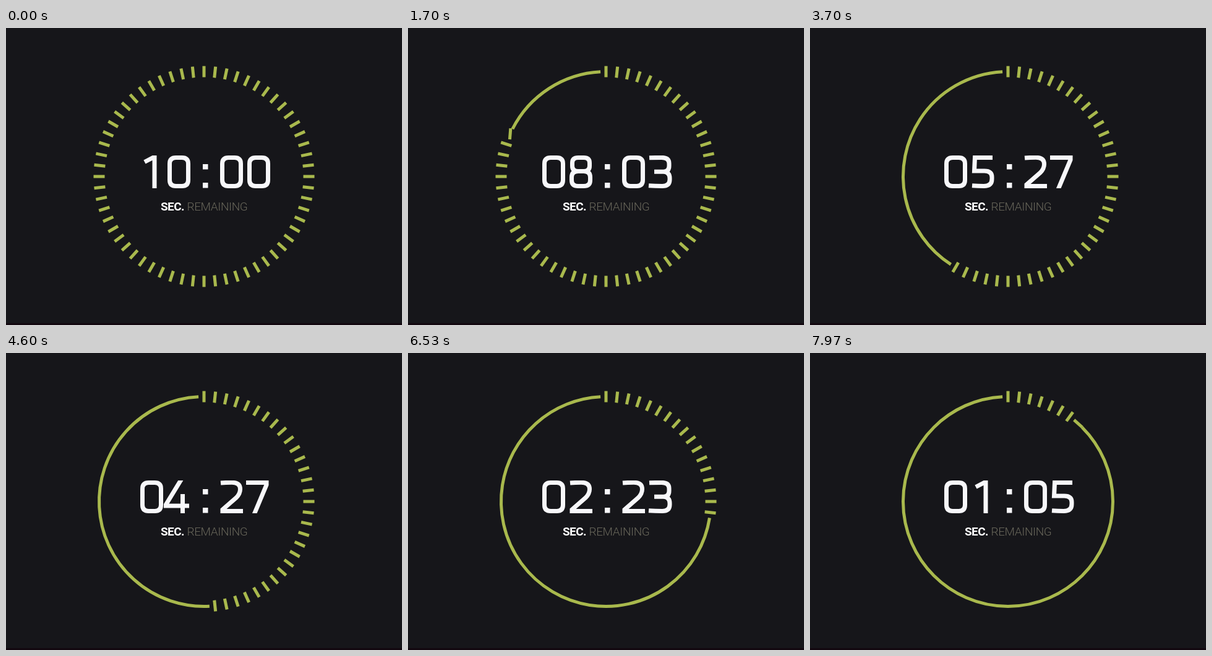
These frames come from a looping animation (640x480 px, 8 s). An HTML page with a canvas:

```html
<!DOCTYPE html>
<html lang="en">
<head>
<meta charset="utf-8">
<title>Countdown</title>
<style>
  html, body { margin: 0; width: 100%; height: 100%; overflow: hidden; background: #16161a; }
  canvas { display: block; }
</style>
</head>
<body>
<canvas id="stage" width="640" height="480"></canvas>
<script>
const ctx = document.getElementById('stage').getContext('2d');
const LOOP = 8000, FPS = 30, TOTAL = 300;
const BG = '#16161a', GREEN = '#a9b94d', WHITE = '#f7f7fa', GREY = '#69675b';
const CX = 320, CY = 240, RADIUS = 169.5, TICK = 18, WIDTH = 5;
const STEP = Math.PI / 30;
const DIGIT_X = [217, 261, 346, 390], DIGIT_Y = 206, DIGIT_W = 37, DIGIT_H = 53;

// Digit strokes in a 37 x 53 cell; 9 is a turned 6.
const SIX = 'M32 3.5H17Q4 3.5 4 16V38Q4 49.5 15 49.5H22Q33 49.5 33 39V34Q33 24.5 22 24.5H4';
const DIGITS = [
  'M13.5 3.5H23.5Q33.5 3.5 33.5 13.5V39.5Q33.5 49.5 23.5 49.5H13.5Q3.5 49.5 3.5 39.5V13.5Q3.5 3.5 13.5 3.5Z',
  'M7 10.5L20.5 3.5H23V54',
  'M1 4Q9 3.3 19 3.3Q32.5 3.3 32.5 14Q32.5 21.5 26 28L4 47V49.5H37',
  'M0 3.8Q9 3.4 20 3.4Q32 3.4 32 13V17Q32 26 23 26.3H8M23 26.3Q33 26.8 33 37V39Q33 49.5 21 49.5Q9 49.5 -1 48.8',
  'M22.5 -2L-2.5 39V41H35M24.5 22V54',
  'M34 3.5H5.5L4.5 25H21Q33 25 33 35V38Q33 49.5 20 49.5Q10 49.5 1 48.8',
  SIX,
  'M-2 3.5H31V7L10.5 56',
  'M14 3.5H23Q32.5 3.5 32.5 12V17Q32.5 25.5 23 25.5H14Q4.5 25.5 4.5 17V12Q4.5 3.5 14 3.5Z'
    + 'M14 25.5H23Q33.5 25.5 33.5 35V40Q33.5 49.5 23 49.5H14Q3.5 49.5 3.5 40V35Q3.5 25.5 14 25.5Z',
  SIX
].map(d => new Path2D(d));

function frameAt(ms) {
  const rest = ms % 100;
  return Math.floor(ms / 100) * 3 + (rest >= 70 ? 2 : rest >= 30 ? 1 : 0);
}

// Each counted second plays in 27 frames, skipping three near its end.
function countAt(frame) {
  const m = frame % 27;
  return Math.floor(frame / 27) * FPS + m + (m >= 24 ? 3 : m >= 20 ? 2 : 0);
}

function turnOf(k, count) {
  const p = Math.min(1, Math.max(0, (count - 29.9 - (k - 6) * 4.93) / 3.5));
  return p * p * (3 - 2 * p);
}

function drawRing(count) {
  ctx.strokeStyle = ctx.fillStyle = GREEN;
  ctx.lineWidth = WIDTH;
  let done = 0;
  for (let k = 1; k <= 60; k++) {
    const turn = turnOf(k, count);
    if (turn === 1) { done = k; continue; }
    ctx.save();
    ctx.translate(CX, CY);
    ctx.rotate(-k * STEP);
    ctx.translate(0, -RADIUS);
    ctx.rotate(turn * Math.PI / 2);
    ctx.fillRect(-WIDTH / 2, -TICK / 2, WIDTH, TICK);
    ctx.restore();
  }
  if (done) {
    const top = -Math.PI / 2;
    ctx.beginPath();
    ctx.arc(CX, CY, RADIUS, top - (done + 0.5) * STEP, top - STEP / 2);
    ctx.stroke();
  }
}

function drawDigit(n, x) {
  ctx.save();
  ctx.translate(x, DIGIT_Y);
  ctx.beginPath();
  ctx.rect(-10, 0, 60, DIGIT_H);
  ctx.clip();
  if (n === 9) {
    ctx.translate(DIGIT_W, DIGIT_H);
    ctx.rotate(Math.PI);
  }
  ctx.stroke(DIGITS[n]);
  ctx.restore();
}

function drawClock(count) {
  const left = TOTAL - count;
  const pad = n => String(n).padStart(2, '0');
  const text = pad(Math.floor(left / FPS)) + pad(left % FPS);
  ctx.strokeStyle = ctx.fillStyle = WHITE;
  ctx.lineWidth = 7;
  [...text].forEach((ch, i) => drawDigit(+ch, DIGIT_X[i]));
  ctx.fillRect(318, 220, 8.5, 8.5);
  ctx.fillRect(318, 250, 8.5, 8.5);
}

function drawLabel(text, x, weight, color, spacing) {
  ctx.font = weight + ' 19px Roboto, sans-serif';
  ctx.letterSpacing = spacing + 'px';
  ctx.fillStyle = color;
  ctx.fillText(text, x, 295);
}

function draw() {
  const count = countAt(frameAt(performance.now() % LOOP));
  ctx.fillStyle = BG;
  ctx.fillRect(0, 0, 640, 480);
  ctx.fillStyle = '#12080f';
  ctx.fillRect(0, 477, 640, 3);
  drawRing(count);
  drawClock(count);
  drawLabel('SEC.', 250, 700, '#ffffff', -0.6);
  drawLabel('REMAINING', 292.5, 300, GREY, -0.4);
  requestAnimationFrame(draw);
}
draw();
</script>
</body>
</html>
```
